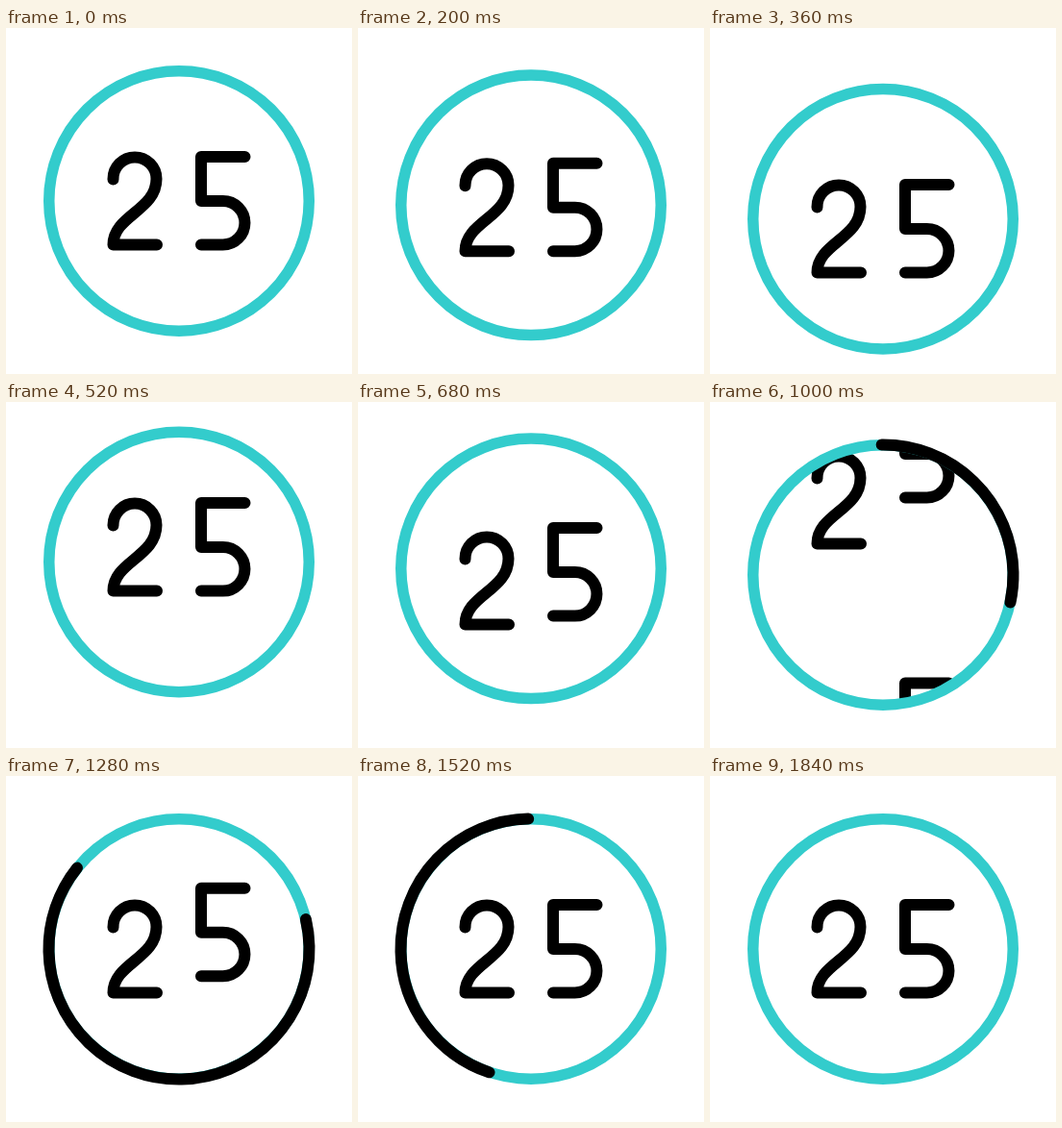
An HTML page that plays this animation: 360 by 360 pixels, repeating every 2 s.

```html
<!DOCTYPE html>
<html lang="en">
<head>
<meta charset="utf-8">
<title>25</title>
<style>
  html, body { margin: 0; width: 100%; height: 100%; overflow: hidden; background: #fff; }
  svg { display: block; width: 100%; height: 100%; }
  path, circle { fill: none; stroke: #000; stroke-width: 12; stroke-linecap: round; stroke-linejoin: round; }
  #ring { stroke: #3cc; stroke-width: 11.5; }
</style>
</head>
<body>
<svg viewBox="0 0 360 360">
  <defs>
    <path id="two" d="M111.5 157.5V157a22.5 22.5 0 0 1 45 0C156.5 190 111.5 195 111.5 225.5H157"/>
    <path id="five" d="M248.5 134H203V180H225.7a22.75 22.75 0 0 1 0 45.5H203"/>
    <clipPath id="inside"><circle id="window" cx="180" cy="180" r="135"/></clipPath>
  </defs>
  <g clip-path="url(#inside)">
    <g id="reelTwo"><use href="#two"/><use href="#two" y="-284.5"/></g>
    <g id="reelFive"><use href="#five"/><use href="#five" y="-284.5"/></g>
  </g>
  <circle id="ring" cx="180" cy="180" r="135.25"/>
  <circle id="arc" cx="180" cy="180" r="135.5" pathLength="360" transform="rotate(-91.2 180 180)" visibility="hidden"/>
</svg>
<script>
const LOOP = 2000, STEP = 40, LAP = 284.5, ARC_END = 1840;
const $ = id => document.getElementById(id);

// Cubic Bezier easing from (0,0) to (1,1) with handles (x1,0) and (x2,1).
const bezier = (x1, x2) => u => {
  let lo = 0, hi = 1;
  for (let i = 0; i < 24; i++) {
    const s = (lo + hi) / 2, r = 1 - s;
    if (3 * x1 * s * r * r + 3 * x2 * s * s * r + s ** 3 < u) lo = s; else hi = s;
  }
  return lo * lo * (3 - 2 * lo);
};
const smooth = u => u * u * (3 - 2 * u);
const settle = bezier(0.3, 0.57);

// Keys are [time, value, easing into this key].
function track(keys, t) {
  if (t <= keys[0][0]) return keys[0][1];
  for (let i = 1; i < keys.length; i++) {
    const [t0, v0] = keys[i - 1], [t1, v1, ease = smooth] = keys[i];
    if (t < t1) return v0 + (v1 - v0) * ease((t - t0) / (t1 - t0));
  }
  return keys[keys.length - 1][1];
}

const bounce = [[133, 0], [350, 29.5], [535, -30]];
const motion = {
  ring: [[133, 0], [350, 19], [560, -17], [770, 0]],
  two: [...bounce, [1224, LAP]],
  five: [...bounce, [1437, LAP, settle]],
  head: [[759, 0], [1440, 360]],
  tail: [[975, 0], [1990, 360]]
};

const shift = (id, y) => $(id).setAttribute("transform", `translate(0 ${y.toFixed(2)})`);

function draw(t) {
  const at = name => track(motion[name], t);
  shift("ring", at("ring"));
  shift("window", at("ring"));
  shift("reelTwo", at("two"));
  shift("reelFive", at("five"));

  const head = at("head"), tail = at("tail"), arc = $("arc");
  arc.setAttribute("visibility", head > 0 && t < ARC_END ? "visible" : "hidden");
  arc.setAttribute("stroke-dasharray", `${Math.max(head - tail, 0.01)} 720`);
  arc.setAttribute("stroke-dashoffset", -tail);
}

const start = performance.now();
function tick() {
  const t = (performance.now() - start) % LOOP;
  draw(Math.floor(t / STEP) * STEP);
  requestAnimationFrame(tick);
}
tick();
</script>
</body>
</html>
```
